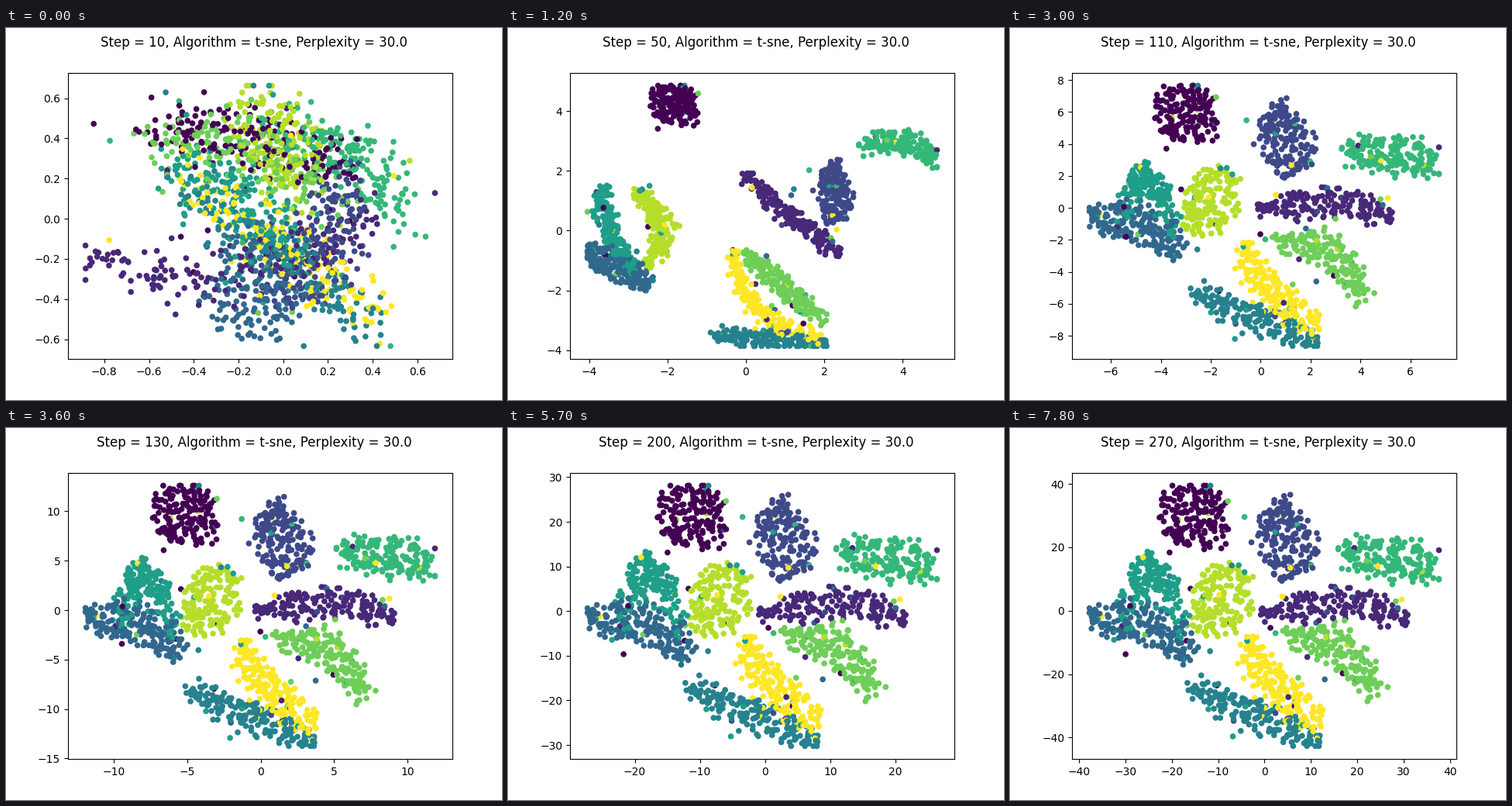
Recreate the animation shown at these times as a matplotlib script. Size 640 by 480 pixels, loop 8 s.

```python
import matplotlib.pyplot as plt
import numpy as np
from matplotlib.animation import FuncAnimation

N_POINTS, N_CLASSES, CLUMP = 1797, 10, 3
INTERVAL, FRAMES, FRAMES_PER_STEP = 100, 80, 3
LEFT, RIGHT, TOP, BOTTOM = 80, 576, 57.6, 427.2

# Each digit is a bent ribbon: start x, y, end x, y (pixels) and bow relative to its chord.
MIXED = [
    (190, 128, 445, 185, -.05), (110, 294, 475, 232, .15), (440, 205, 380, 350, 0),
    (285, 310, 365, 345, 0), (235, 200, 475, 385, 0), (220, 170, 380, 290, 0),
    (335, 145, 512, 250, -.2), (195, 150, 425, 215, -.1), (325, 88, 380, 215, 0),
    (235, 190, 480, 370, 0),
]
EXAGGERATED = [
    (218, 76, 212, 122, 0), (306, 188, 430, 290, .03), (418, 178, 425, 250, 0),
    (104, 283, 182, 326, .05), (268, 397, 410, 406, 0), (123, 204, 165, 312, .12),
    (462, 152, 553, 172, -.17), (308, 292, 405, 376, 0), (165, 212, 180, 308, -.28),
    (292, 292, 400, 396, .2),
]
CURLED = [
    (184, 76, 208, 124, 0), (309, 212, 433, 230, .03), (330, 122, 378, 172, 0),
    (105, 235, 178, 268, .04), (252, 361, 390, 410, .02), (152, 172, 185, 258, .2),
    (452, 155, 555, 157, -.08), (305, 300, 402, 376, -.35), (232, 195, 185, 258, -.12),
    (288, 306, 388, 400, .13),
]
SETTLED = [
    (245, 77, 232, 152, 0), (326, 242, 515, 247, -.1), (342, 100, 372, 190, 0),
    (105, 245, 235, 292, -.12), (235, 335, 400, 405, 0), (148, 272, 224, 266, -1.15),
    (432, 160, 552, 178, 0), (360, 270, 468, 345, -.2), (290, 180, 255, 265, 0),
    (308, 278, 400, 382, .08),
]
PHASE_STEPS, PHASES = [10, 50, 90, 100, 110, 160], [0, 1, 2, 2.1, 2.75, 3]

# Axis limits (left, right, bottom, top) over the steps.
LIMIT_STEPS = [10, 50, 90, 110, 160, 200, 270]
LIMITS = np.array([
    (-0.962, 0.756, -0.6985, 0.7275), (-4.484, 5.314, -4.290, 5.279),
    (-4.728, 5.895, -6.005, 5.782), (-7.558, 7.842, -9.460, 8.460),
    (-21.45, 20.85, -23.48, 22.08), (-29.93, 29.04, -33.16, 31.02),
    (-41.50, 41.34, -46.77, 43.52),
])

rng = np.random.default_rng(7)
index = np.arange(N_POINTS)
labels = index % N_CLASSES
stray = rng.random(N_POINTS) < 0.05
homes = np.where(stray, rng.integers(0, N_CLASSES, N_POINTS), labels)
jitter = rng.normal(size=(2, N_POINTS))
jitter = (jitter[0] + 1j * jitter[1]) * np.where(stray, 3, 1)

# Clumps of a few points fill each ribbon evenly by a low-discrepancy sequence.
clump = index // N_CLASSES // CLUMP + 1
along = clump * 0.7549 % 1
across = 2 * (clump * 0.5698 % 1) - 1


def ribbon_points(ribbons, area, spread):
    """Complex pixel positions; every ribbon covers the same area."""
    x0, y0, x1, y1, bow = np.array(ribbons, float)[homes].T
    start, chord = x0 + 1j * y0, x1 - x0 + 1j * (y1 - y0)
    spine = start + chord * (along + 4j * bow * along * (1 - along))
    tangent = chord * (1 + 4j * bow * (1 - 2 * along))
    length = np.abs(chord) * (1 + 1.1 * np.abs(bow) ** 1.5)
    taper = 0.6 + 0.6 * np.sin(np.pi * along)
    width = area / (2 * length) * taper
    return spine + 1j * tangent / np.abs(tangent) * across * width + spread * jitter


layouts = [
    ribbon_points(MIXED, 10000, 16),
    ribbon_points(EXAGGERATED, 2400, 4),
    ribbon_points(CURLED, 2800, 4.5),
    ribbon_points(SETTLED, 5800, 5),
]

fig, ax = plt.subplots(figsize=(6.4, 4.8), dpi=100)
title = fig.suptitle("")
dots = ax.scatter(index, index, s=20, c=labels, cmap="viridis")


def update(frame):
    step = 10 + 10 * (frame // FRAMES_PER_STEP)
    phase = np.interp(step, PHASE_STEPS, PHASES)
    i = min(int(phase), len(layouts) - 2)
    pixels = layouts[i] + (phase - i) * (layouts[i + 1] - layouts[i])
    x0, x1, y0, y1 = (np.interp(step, LIMIT_STEPS, column) for column in LIMITS.T)
    # Keep the 5 % margin that autoscaling leaves around the data.
    across_axes = np.clip((pixels.real - LEFT) / (RIGHT - LEFT), 1 / 22, 21 / 22)
    up_axes = np.clip((BOTTOM - pixels.imag) / (BOTTOM - TOP), 1 / 22, 21 / 22)
    dots.set_offsets(np.column_stack([x0 + across_axes * (x1 - x0),
                                      y0 + up_axes * (y1 - y0)]))
    ax.set_xlim(x0, x1)
    ax.set_ylim(y0, y1)
    title.set_text(f"Step = {step}, Algorithm = t-sne, Perplexity = 30.0")
    return dots, title


animation = FuncAnimation(fig, update, frames=FRAMES, interval=INTERVAL,
                          repeat=True, repeat_delay=0)
plt.show()
```
